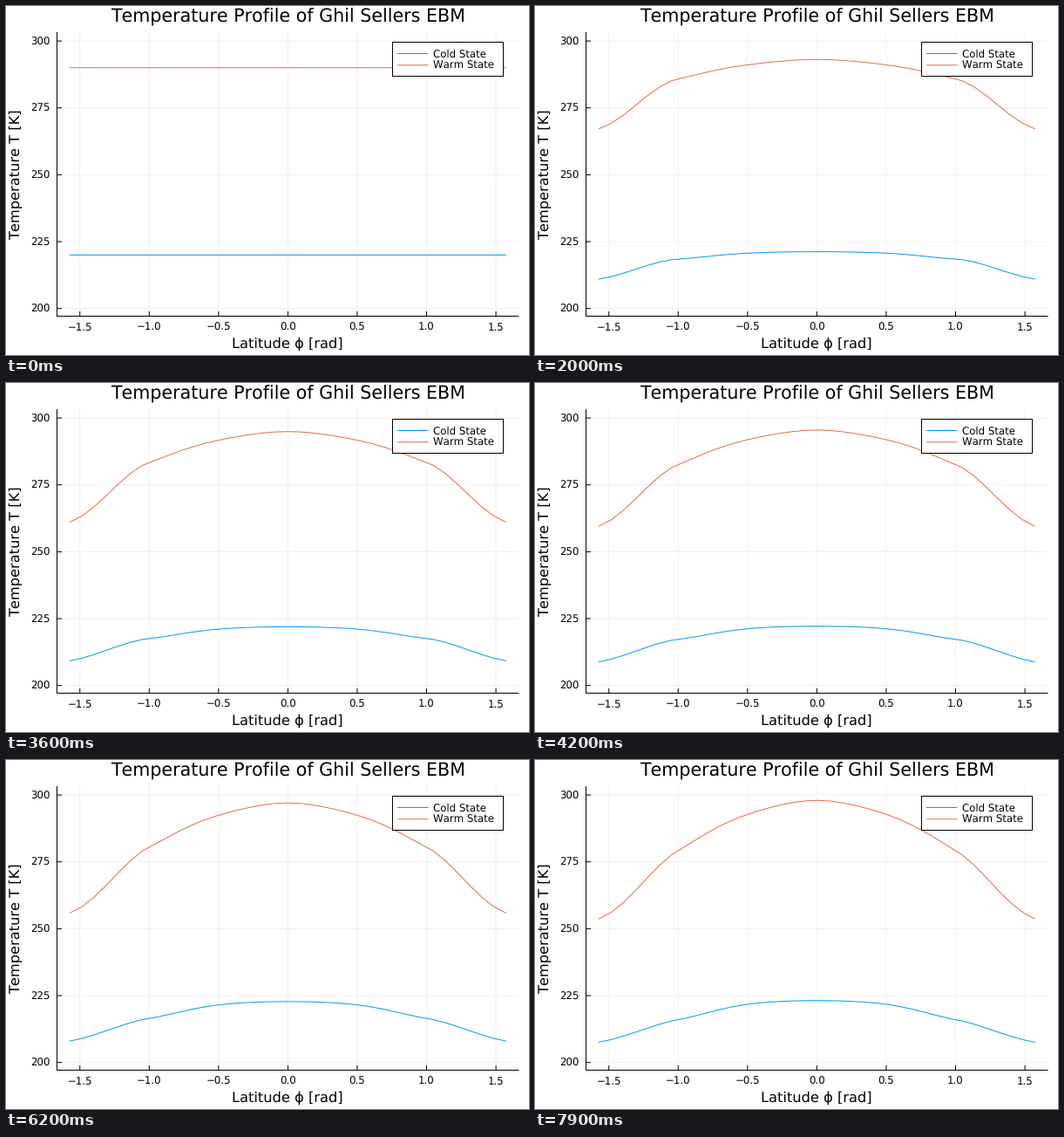
A matplotlib script for the animation above (8000 ms loop, 600 by 400 pixels).

```python
import numpy as np
import matplotlib.pyplot as plt
from matplotlib.animation import FuncAnimation
from matplotlib.patches import Rectangle

W, H, DPI = 600, 400, 100
FRAMES, STEP = 80, 100
BLUE, ORANGE, GRID = "#009AFA", "#E36F47", "#F0F0F0"
TITLE, GUIDE, SMALL = 20.6, 16.2, 11.75
LEFT, RIGHT, TOP, BOTTOM = 58.5, 588, 30.5, 355.5

plt.rcParams["font.family"] = "DejaVu Sans"
plt.rcParams["text.hinting"] = "none"
plt.rcParams["text.kerning_factor"] = 6  # practically no kerning


def px(n):
    return n * 72 / DPI


def X(phi):
    return 323.4 + 159.1 * phi


def Y(temp):
    return 346.7 - 3.066 * (temp - 200)


PHI = np.linspace(-np.pi / 2, np.pi / 2, 37)


def polar_cap():
    """Smooth step rising from 58 degrees towards the poles."""
    u = np.clip((np.degrees(np.abs(PHI)) - 58) / 36, 0, 1)
    return u * u * (3 - 2 * u)


def harmonics(coefs):
    return sum(c * np.cos(2 * k * PHI) for k, c in enumerate(coefs))


class State:
    """Uniform start; the caps cool fast, the global pattern relaxes slowly."""

    def __init__(self, name, color, start, cap, coefs):
        self.name, self.color, self.start = name, color, start
        self.fast = -cap * polar_cap()
        self.slow = harmonics(coefs)

    def profile(self, t):
        return (self.start + self.fast * (1 - np.exp(-t))
                + self.slow * (1 - np.exp(-t / 6)))


STATES = [
    State("Cold State", BLUE, 220, 9.1, [-1.38, 5.8, 0.76, -1.17, 0.3]),
    State("Warm State", ORANGE, 290, 19.0, [-6.75, 18.4, -0.64, -0.7, 0.6]),
]

fig = plt.figure(figsize=(W / DPI, H / DPI), dpi=DPI, facecolor="white")
ax = fig.add_axes([0, 0, 1, 1])
ax.set_xlim(0, W)
ax.set_ylim(H, 0)
ax.axis("off")


def line(xs, ys, color="black", z=3):
    return ax.plot(xs, ys, color=color, lw=px(1), zorder=z, snap=False)[0]


def label(x, y, text, size, ha="center", **kw):
    ax.text(x, y, text, fontsize=px(size), ha=ha, va="baseline", **kw)


# Grid, ticks and axes
for v in np.arange(-1.5, 1.6, 0.5):
    x = X(v)
    line([x, x], [TOP, BOTTOM], GRID, 1)
    line([x, x], [BOTTOM, BOTTOM - 5])
    label(x, 371.6, f"{v:.1f}".replace("-", "\u2212"), SMALL)
for v in range(200, 301, 25):
    y = Y(v)
    line([LEFT, RIGHT], [y, y], GRID, 1)
    line([LEFT, LEFT + 5], [y, y])
    label(50.7, y + 4.3, str(v), SMALL, ha="right")
line([LEFT, LEFT, RIGHT], [TOP, BOTTOM, BOTTOM])

label(324, 18.4, "Temperature Profile of Ghil Sellers EBM", TITLE)
label(323.2, 392, "Latitude \u03d5 [rad]", GUIDE)
label(16.2, 192.7, "Temperature T [K]", GUIDE,
      rotation=90, rotation_mode="anchor")

# Curves and legend
ax.add_patch(Rectangle((443.5, 41.5), 127, 39, fc="white", ec="black",
                       lw=px(1), zorder=5, snap=False))
curves = []
for k, s in enumerate(STATES):
    y = 54.5 + 13.3 * k
    line([449.5, 484], [y, y], s.color, 6)
    label(489.5, y + 4.5, s.name, SMALL, ha="left", zorder=6)
    curves.append(line(X(PHI), Y(s.profile(0)), s.color, 4))


def update(i):
    for curve, s in zip(curves, STATES):
        curve.set_ydata(Y(s.profile(i * STEP / 1000)))
    return curves


anim = FuncAnimation(fig, update, frames=FRAMES, interval=STEP,
                     repeat=True, repeat_delay=0, blit=False)
plt.show()
```
